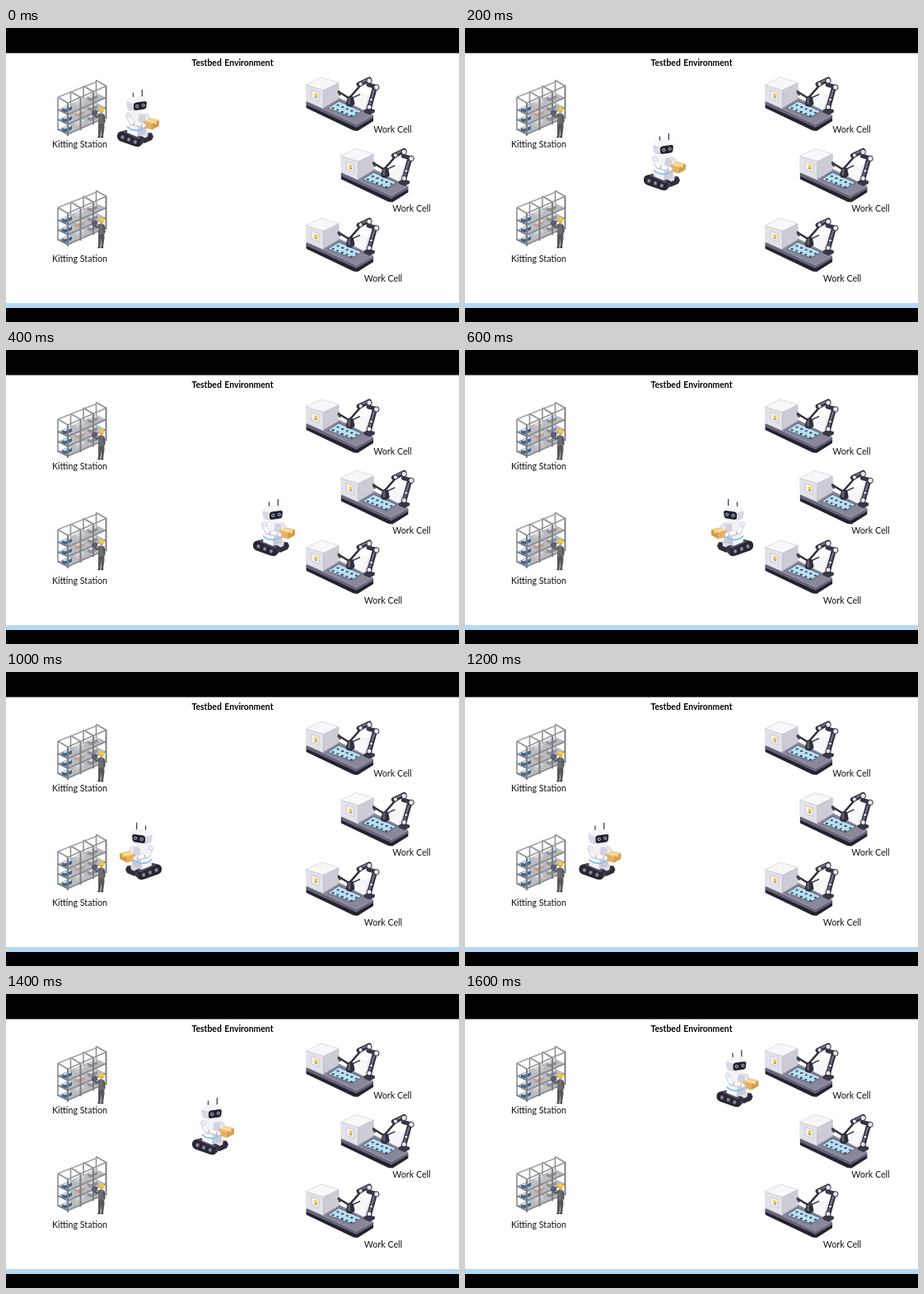
An HTML page for the animation above (2 s loop, 550 by 357 pixels).

```html
<!DOCTYPE html>
<html lang="en">
<head>
<meta charset="utf-8">
<title>Testbed Environment</title>
<style>
  html, body { margin: 0; width: 100%; height: 100%; overflow: hidden; background: #fff; }
  svg { display: block; width: 550px; height: 357px; }
  text { font: 10.7px Lato, "Open Sans", sans-serif; text-anchor: middle; fill: #111; }
  .title { font-weight: 700; font-size: 10.4px; word-spacing: 1px; fill: #000; }
</style>
</head>
<body>
<svg viewBox="0 0 550 357">
  <defs>
    <g id="shelf">
      <g id="rack"></g>
      <!-- worker -->
      <path d="M112 112L119 111 119.5 121 118 132 115.5 132 115.8 121 114.5 132 112 132Z" fill="#55575b"/>
      <path d="M112 104.500Q116 102 119.500 105L120.300 116 112.300 117Z" fill="#6a6c70"/>
      <path d="M114 105.500L110.500 108 106 104.500" fill="none" stroke="#5b5d61" stroke-width="2.300" stroke-linejoin="round"/>
      <path d="M118.800 106L119.800 114" stroke="#484a4e" stroke-width="1.800"/>
      <path d="M112 131.500l2.500.4v1.300h-3.500zM115.800 131.500l2.500.4v1.300h-3.500z" fill="#333"/>
      <path d="M104 101l4-1.700 3 1.500v4l-4 1.800-3-1.600z" fill="#5f5b70"/>
      <circle cx="116" cy="101.300" r="2.300" fill="#d8a58c"/>
      <path d="M112.600 101Q112.600 96.200 116.500 96.300 119.800 96.800 119.500 101.300L116 100.300Z" fill="#f4cf1d"/>
    </g>

    <g id="cell">
      <!-- bed -->
      <path d="M364.500 90L383 82 446 107 446 113 427 125 422 124.500 364.500 97Z" fill="#24222c"/>
      <path d="M365 89L384 80 446 106 445.800 109.500 425.500 121 365 93.500Z" fill="#66647b"/>
      <path d="M365 88.500L390 77.500 446 105.500 425.500 117 Z" fill="#898799"/>
      <path d="M365 89L425.500 117 445.800 105.800" fill="none" stroke="#aaa8b9" stroke-width=".7"/>
      <path d="M390 97.500L404 88 433 101 420 109Z" fill="#5d5c72"/>
      <path d="M391.500 97.300L404 89.300 431 101.200 420 107.800Z" fill="#b8dff0"/>
      <g id="parts"></g>
      <!-- cabinet -->
      <path d="M364 69L383 60 404 66.500 385.500 75.500Z" fill="#f8f8fa"/>
      <path d="M364 69L385.500 75.500V98L364 88.500Z" fill="#e2e2e8"/>
      <path d="M385.500 75.500L404 66.500V86L385.500 97Z" fill="#cdccd6"/>
      <path d="M364 69L385.500 75.500 404 66.500M385.500 75.500V97" fill="none" stroke="#b7b6c3" stroke-width=".6"/>
      <path d="M364 69L383 60 404 66.500V85" fill="none" stroke="#bbb" stroke-width=".5"/>
      <path d="M371 75.500l9 3.200v10l-9-3.700z" fill="#f2f2f5" stroke="#a9a8b5" stroke-width=".5"/>
      <path d="M374.500 79l3.600 1.300v4l-3.600-1.400z" fill="#f2cc2c"/>
      <path d="M374.700 83.600l3 1.200" stroke="#484653" stroke-width=".8"/>
      <!-- guard -->
      <path d="M427 83L441 79.500 440 102 425.500 95Z" fill="#e4e4ec"/>
      <path d="M427 83L441 79.500 435 99.500 425.500 95Z" fill="#f7f7fa"/>
      <!-- right arm -->
      <path d="M434 100l6-3.500 8 3-.5 3-6 3-7-3z" fill="#393745"/>
      <path d="M441 97L448 72" stroke="#343240" stroke-width="6" stroke-linecap="round"/>
      <path d="M441 95L447 75" stroke="#777588" stroke-width="2.200"/>
      <path d="M440 69L449.500 71.500" stroke="#373544" stroke-width="5" stroke-linecap="round"/>
      <g fill="#e7e6ee" stroke="#2d2b36" stroke-width="1">
        <circle cx="441" cy="96" r="3"/><circle cx="449.800" cy="72" r="3.200"/><circle cx="443.500" cy="87" r="2"/>
      </g>
      <!-- left arm -->
      <path d="M404 77.500L417 85.500" stroke="#302e3a" stroke-width="2.500"/>
      <path d="M403 75.500l3 1.200.5 5-1.500.5-2.500-4z" fill="#3f3d4b"/>
      <path d="M416 86L430 70" stroke="#302e3a" stroke-width="2.600"/>
      <path d="M418 86L430 80.500" stroke="#474552" stroke-width="1.700"/>
      <path d="M412.500 92l2.500-8.500 4-1.500 3 2.500 1.500 8-4.500 3.500-5-1.300z" fill="#302e3a"/>
      <path d="M415.500 85l2.500-1 .2 9-3.300-1z" fill="#615f70"/>
      <path d="M428.500 68.500L441 62.500" stroke="#343240" stroke-width="6" stroke-linecap="round"/>
      <path d="M431 66.500L440 62" stroke="#777588" stroke-width="2"/>
      <g fill="#e7e6ee" stroke="#2d2b36" stroke-width="1">
        <circle cx="430.500" cy="68" r="2.600"/><circle cx="441" cy="64" r="3.200"/>
      </g>
    </g>

    <g id="bot">
      <path d="M164 134l8-7 5 .5 2 4.500-2 4-9 4z" fill="#302e3a"/>
      <path d="M143 127L157 119 173 126 172 132 160 137 144 131Z" fill="#dcdbe6"/>
      <!-- tread -->
      <path d="M135 130.500Q135.500 126 140 125.500L146 124 166 132Q170 134 168 138.500L163 143.300Q160.500 145 156 143.500L139 137.500Q134.500 135.500 135 130.500Z" fill="#292731"/>
      <path d="M141 126L146 124.500 165.500 132.500 161 135.500Z" fill="#504e5e"/>
      <path d="M163.500 136.500l4-2M163.500 139l4.200-2.200M163 141.500l4-2.500" stroke="#68667a" stroke-width=".7"/>
      <g id="wheels" fill="#686677" stroke="#121118" stroke-width=".8"></g>
      <!-- torso -->
      <path d="M148 119L158 115 171 120 170 128 159 132 147 127Z" fill="#f5f5f9"/>
      <path d="M160 121L171 120 170 128 159 132Z" fill="#cac9d8"/>
      <path d="M147 119.500Q151 124.500 160 124.500L167 122" fill="none" stroke="#7fc3ec" stroke-width="1.800"/>
      <path d="M150 103L160 99.500 170 104 169 119 160 122.500 150 118Z" fill="#f2f2f7"/>
      <path d="M161 105L170 104 169 119 160 122.500Z" fill="#d2d1df"/>
      <!-- arms and box -->
      <path d="M169 105Q174 106 173 112" fill="none" stroke="#e3e2ec" stroke-width="4" stroke-linecap="round"/>
      <path d="M167 113.500L175 109.500 186 112 185.800 119 177.500 123.500 167 120.500Z" fill="#d69b48"/>
      <path d="M167 113.500L175 109.500 186 112 177.700 116.500Z" fill="#f4cf84"/>
      <path d="M167 113.500L177.700 116.500 177.500 123.500 167 120.500Z" fill="#e5b160"/>
      <path d="M171 111.500l10.500 3v2.500" fill="none" stroke="#faedc9" stroke-width="1.200"/>
      <path d="M148.500 107L152 115 168 119" fill="none" stroke="#c2c1d0" stroke-width="5.600" stroke-linecap="round" stroke-linejoin="round"/>
      <path d="M148.500 106.500L152 114.300 167 118" fill="none" stroke="#f9f9fc" stroke-width="4.500" stroke-linecap="round" stroke-linejoin="round"/>
      <path d="M156 113.500l-1 4.200M165 116l-1 4" stroke="#8d8b9d" stroke-width=".8"/>
      <circle cx="148.500" cy="105.800" r="3.200" fill="#ececf3" stroke="#c1c0d0" stroke-width=".5"/>
      <!-- head -->
      <path d="M154.500 87V78.500M165.300 85V75" stroke="#44434d" stroke-width="1.300"/>
      <path d="M146.500 89Q147 85.500 151 84.500L161 82.500Q164 82.300 167 83.800L171 86Q173 87.500 172.800 91L172 97Q171.500 100 168 100.800L158 102.300 149 99.500Q146 97.500 146.500 89Z" fill="#f5f5f9"/>
      <path d="M146.500 89L155 92 155.500 101.500 149 99.500Q146 97.500 146.500 89Z" fill="#d9d8e5"/>
      <path d="M155 93Q155.300 91 157.500 90.500L168.500 89Q171 89 170.800 91.500L170.300 96Q170 98 168 98.400L157.500 100Q155.300 100 155 98Z" fill="#23212b"/>
      <g fill="#353947" stroke="#b5c9df" stroke-width=".9">
        <circle cx="159.300" cy="95" r="1.700"/><circle cx="166.800" cy="93.800" r="1.600"/>
      </g>
    </g>
  </defs>

  <rect width="550" height="357" fill="#fff"/>
  <rect width="550" height="30.500"/>
  <rect y="334" width="550" height="6.500" fill="#b4d9f2"/>
  <rect y="340" width="550" height="17"/>
  <text class="title" x="275" y="46.300">Testbed Environment</text>

  <use href="#shelf"/>
  <use href="#shelf" y="134"/>
  <text x="89.500" y="145.300">Kitting Station</text>
  <text x="89.500" y="283.500">Kitting Station</text>

  <use href="#cell"/>
  <use href="#cell" x="42.300" y="86.500"/>
  <use href="#cell" y="171"/>
  <text x="469.500" y="127">Work Cell</text>
  <text x="492.500" y="223">Work Cell</text>
  <text x="458" y="307.500">Work Cell</text>

  <use href="#bot" id="robot"/>
</svg>
<script>
const get = id => document.getElementById(id);
const line = (x1, y1, x2, y2, color, w) =>
  `<path d="M${x1} ${y1}L${x2} ${y2}" stroke="${color}" stroke-width="${w}"/>`;
const bin = (x, y, color) =>
  `<path d="M${x} ${y}l9-4 3 1.500v4l-8 3.600-4-1.800z" fill="${color}"/>` +
  `<path d="M${x} ${y}l9-4 3 1.500-8 3.600z" fill="#d7dce3"/>`;

// Shelving: three bays rising to the right, three levels each
function buildRack() {
  const slope = -0.44, bays = [0, 15.500, 31, 46.500];
  let s = "";
  for (const x of bays) s += line(63 + x, 84 + x * slope, 63 + x, 124 + x * slope, "#8d8f92", 1.600);
  for (let k = 2; k >= 0; k--) {
    const y = 100 + k * 12;
    s += `<path d="M63 ${y - 1}l12 6 46.500-20.500-12-6z" fill="#b9bbbe"/>`;
    bays.slice(0, 3).reverse().forEach((x, i) => {
      const color = i === 2 ? "#3c6590" : i === 1 ? (k === 1 ? "#c79b91" : "#c9c4c4") : "#8e9096";
      s += bin(68 + x, y - 2.500 + x * slope, color);
    });
    s += line(63, y - 1, 75, y + 5, "#77797d", 1.700) + line(75, y + 5, 121.500, y - 15.500, "#85878b", 1.700);
  }
  for (const x of bays) {
    const y = 91 + x * slope;
    s += line(63 + x, y - 7, 75 + x, y, "#929498", 1.800) + line(75 + x, y - 1, 75 + x, y + 40, "#7c7e82", 2);
  }
  return s + line(63, 84, 109.500, 63.500 + 2, "#a0a2a5", 1.400) + line(75, 91, 121.500, 70.500, "#96989b", 1.600);
}

function buildParts() {
  let s = "";
  for (let i = 0; i < 5; i++) for (let j = 0; j < 2; j++) {
    const x = 397 + i * 5.600 + j * 6, y = 97.300 + i * 2.300 - j * 3.600;
    s += `<ellipse cx="${x}" cy="${y}" rx="1.700" ry="1.100" fill="${(i + j) % 2 ? "#35627d" : "#3d3b4c"}"/>`;
  }
  return s;
}

get("rack").innerHTML = buildRack();
get("parts").innerHTML = buildParts();
get("wheels").innerHTML = [0, 1, 2].map(i =>
  `<ellipse cx="${141.500 + i * 7.700}" cy="${132.500 + i * 2.900}" rx="2.900" ry="3.300"/>` +
  `<circle cx="${141.300 + i * 7.700}" cy="${132.600 + i * 2.900}" r="1" fill="#b1afbe" stroke="none"/>`).join("");

// Stops of the round trip: x and y offset, facing
const stops = [
  [0, 0, 1], [82, 53, 1], [165, 106, 1],
  [165, 106, -1], [86, 106, -1], [4, 108, -1],
  [3.500, 108, 1], [91, 51, 1], [170.500, -7, 1]
];
const center = 160, hold = 200, loop = 2000;

function draw(now) {
  const [x, y, face] = stops[Math.min(Math.floor(now % loop / hold), stops.length - 1)];
  const shift = face > 0 ? x : x + 2 * center;
  get("robot").setAttribute("transform", `translate(${shift} ${y}) scale(${face} 1)`);
}

const start = performance.now();
function tick() {
  draw(performance.now() - start);
  requestAnimationFrame(tick);
}
draw(0);
requestAnimationFrame(tick);
</script>
</body>
</html>
```
